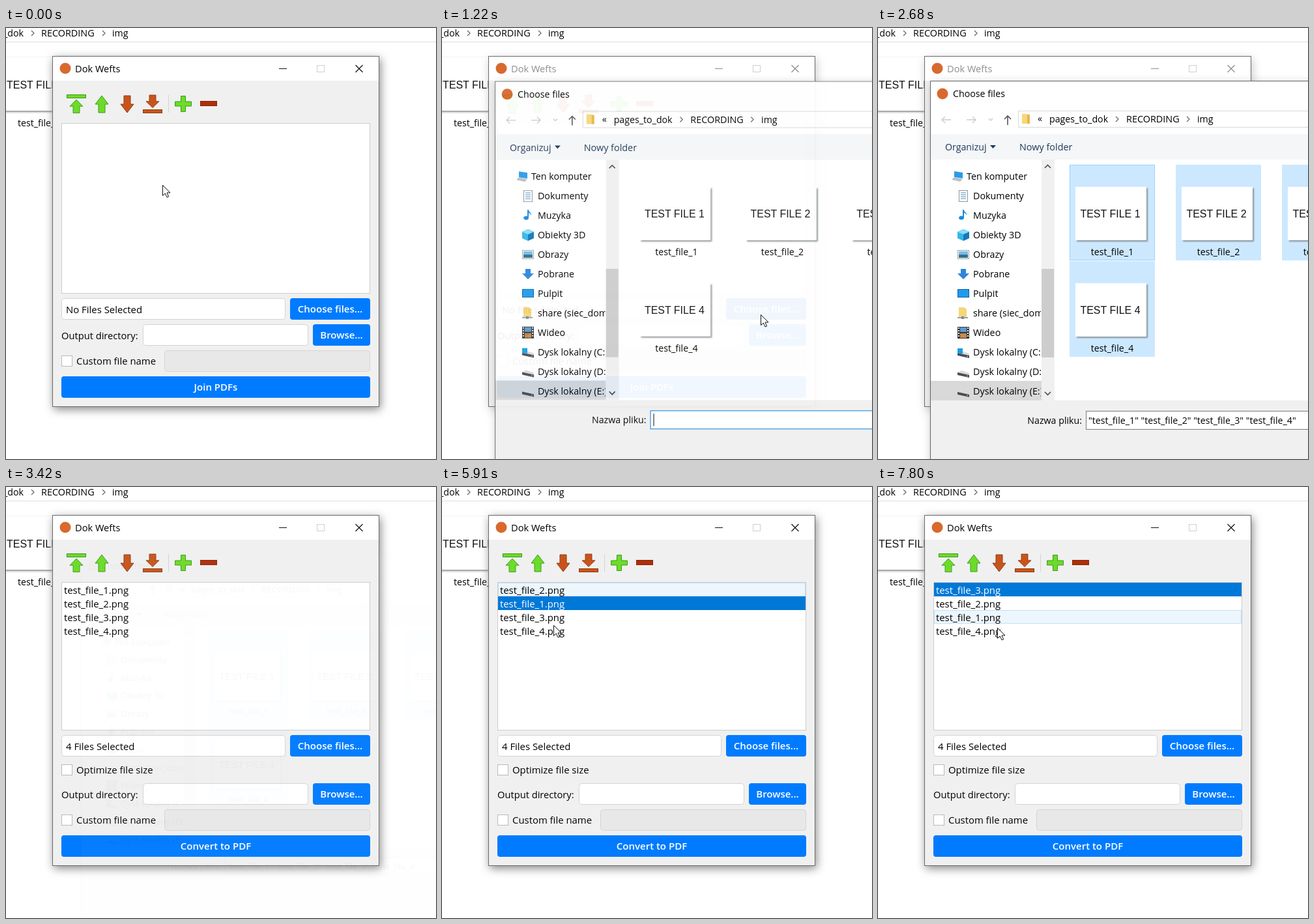
Animation, 660 px wide and 662 px high, one loop 7990 ms. Source, as an HTML page:

```html
<!DOCTYPE html>
<html lang="en">
<head>
<meta charset="utf-8">
<title>File joiner demo</title>
<style>
  html, body { margin: 0; width: 100%; height: 100%; overflow: hidden; background: #fff; }
  svg { display: block; width: 660px; height: 662px; }
  text { font-family: "Open Sans", "Noto Sans", sans-serif; white-space: pre; }
  .img { font-family: "Liberation Sans", Arial, sans-serif; }
  #app .ctl { stroke: #111; fill: none; }
  #app.idle .ctl { stroke: #8c8c8c; }
  #app.idle .title { fill: #8f8f8f; }
  #app.idle #shade { opacity: .45; }
</style>
</head>
<body>
<svg id="stage" viewBox="0 0 660 662" xmlns="http://www.w3.org/2000/svg"></svg>
<script>
const LOOP = 7990, BLUE = '#007bff';
const GREEN = 'fill="#6bdc28" stroke="#3c9a1b"';
const RUST = 'fill="#c9541b" stroke="#8e3b13"';

const rect = (x, y, w, h, fill, more = '') =>
  `<rect x="${x}" y="${y}" width="${w}" height="${h}" fill="${fill}" ${more}/>`;
const box = (x, y, w, h, fill, line, r = 0, more = '') =>
  rect(x + .5, y + .5, w - 1, h - 1, fill, `stroke="${line}" rx="${r}" ${more}`);
// y is the middle of the capital letters
const text = (x, y, s, size = 14.2, more = '') =>
  `<text x="${x}" y="${(y + size * .36).toFixed(1)}" font-size="${size}" ${more}>${s}</text>`;
const path = (d, more) => `<path d="${d}" ${more}/>`;
const line = (d, color, w = 1) => path(d, `fill="none" stroke="${color}" stroke-width="${w}"`);
const at = (x, y, s) => `<g transform="translate(${x} ${y})">${s}</g>`;
const group = (id, s, more = '') => `<g id="${id}" ${more}>${s}</g>`;
const MID = 'text-anchor="middle"';
const chevron = (x, y, color = '#666') => line(`M${x - 2} ${y - 4}l4 4l-4 4`, color, 1.2);

const button = (x, y, w, label, id = '') =>
  rect(x, y, w, 33, BLUE, `rx="4" ${id && `id="${id}"`}`) +
  text(x + w / 2, y + 17, label, 15, `${MID} font-weight="600" fill="#fff"`);
const field = (x, y, w, fill = '#fff') => box(x, y, w, 33, fill, '#d4d4d4', 4);
const check = (y, label) => box(85, y, 17, 17, '#fff', '#b9b9b9') + text(108, y + 9, label, 14.9);

function backdrop() {
  return text(27, 8, '_dok', 14.2, 'text-anchor="end"') + chevron(41, 8) +
    text(54, 8, 'RECORDING', 14.4) + chevron(150, 8) + text(163, 8, 'img') +
    rect(0, 21, 660, 1, '#dedede') + rect(0, 44, 71, 1, '#f4f4f4') +
    rect(0, 127, 72, 2, '#a8a8a8') + rect(0, 129, 72, 2, '#e2e2e2') +
    text(1, 87, 'TEST FILE 1', 16, 'class="img" fill="#111"') + text(18, 146, 'test_file_1');
}

function toolbar() {
  const up = 'M0 0L10 13H5V26H-5V13H-10Z', down = 'M0 26L10 13H5V0H-5V13H-10Z';
  return path(up, `${GREEN} transform="translate(108 110) scale(1 .79)"`) +
    box(93, 102, 30, 6, '#6bdc28', '#3c9a1b') +
    at(147, 104, path(up, GREEN)) + at(186, 104, path(down, RUST)) +
    path(down, `${RUST} transform="translate(225 103) scale(1 .75)"`) +
    box(210, 125, 30, 6, '#c9541b', '#8e3b13') + rect(249, 103, 1, 27, '#d2d2d2') +
    path('M268.5 104.5h7v8.5h9v7h-9v8.5h-7v-8.5h-9v-7h9z', GREEN) +
    box(298, 112, 26, 8, '#b02e0a', '#84240a');
}

function app() {
  const controls = path('M419 62.5h12M536.5 57l11 11m0-11l-11 11', 'class="ctl" stroke-width="1.2"') +
    box(477, 57, 12, 11, 'none', '#cfcfcf');
  const rows = [0, 1, 2, 3].map(i =>
    rect(86.5, 147.5 + 21 * i, 471, 20, 'none', `id="row${i}"`) +
    text(89, 158.5 + 21 * i, '', 14.9, `id="name${i}"`)).join('');
  return rect(71, 43, 502, 539, '#888', 'id="shade" filter="url(#soft)"') +
    box(71, 43, 502, 539, '#f0f0f0', '#6a6a6a') + rect(72, 44, 500, 37, '#fff') +
    '<circle cx="91" cy="62" r="8.5" fill="#d8692f"/>' +
    text(106, 62.5, 'Dok Wefts', 14.6, 'class="title"') + controls +
    rect(0, 98.5, 37, 37, '#dcebf7', 'id="hot" stroke="#b9d7ee"') + toolbar() +
    group('before', box(85, 146, 474, 262, '#fff', '#cdcdcd') + field(85, 415, 344) +
      text(92, 432.5, 'No Files Selected', 14.9) + button(436, 415, 123, 'Choose files...', 'choose') +
      button(85, 535, 474, 'Join PDFs')) +
    group('after', box(85, 146, 474, 228, '#fff', '#cdcdcd') + rows + field(85, 381, 344) +
      text(92, 398.5, '4 Files Selected', 14.9) + button(436, 381, 123, 'Choose files...') +
      check(426, 'Optimize file size') + button(85, 535, 474, 'Convert to PDF')) +
    text(85, 472.5, 'Output directory:', 14.7) + field(210, 455, 254) +
    button(471, 455, 88, 'Browse...') + check(503, 'Custom file name') + field(243, 495, 316, '#e8e8e8');
}

// sidebar icons, drawn around their middle
const drive = path('M-9 -1l6-3l12 4v3z', 'fill="#dadada"') + path('M-9 -1l18 4v4l-18-4z', 'fill="#4b4e52"') +
  rect(5, 4, 2, 1, '#9fe08a');
const monitor = box(-9, -7, 18, 13, '#1f9bec', '#0b62a8');
const icons = [
  path('M-5 -8l13 2v9l-13-2z', 'fill="#2c9be8"') + path('M-9 5l4-4l13 3l-4 4z', 'fill="#b9c0c6"'),
  box(-7, -9, 14, 18, '#fff', '#8c979f') + line('M-4 -5h8M-4 -2h8M-4 1h8M-4 4h8', '#4f8fc0'),
  path('M-1 -9h2c0 4 5 4 4 9c-1-3-2-4-4-4v8a4 3 0 1 1-2-3z', 'fill="#1b8be0"'),
  path('M-9 -5l9-4v18l-9-4z', 'fill="#35b5e8"') + path('M0 -9l9 4v10l-9 4z', 'fill="#1579b8"') +
    path('M-9 -5l9-4l9 4l-9 4z', 'fill="#8adcf7"'),
  box(-9, -7, 18, 14, '#fff', '#9aa3aa') + rect(-7, -5, 14, 5, '#72bdf0') + rect(-7, 0, 14, 5, '#3b6f86'),
  path('M-4 -8h8v7h5l-9 9l-9-9h5z', 'fill="#2d86dc"'),
  monitor,
  path('M-7 -9h8l4 3v12h-12z', 'fill="#f5d679"') + rect(-9, 6, 16, 2, '#96a3ad') + rect(-3, 5, 4, 4, '#7d8a94'),
  rect(-9, -9, 18, 18, '#333') + rect(-5, -8, 10, 7, '#5b9cd0') + rect(-5, 1, 10, 7, '#c78a4b') +
    path('M-7 -8v16M7 -8v16', 'stroke="#eee" stroke-width="2" stroke-dasharray="2 2"'),
  at(0, 2, drive) + rect(-9, -6, 8, 8, '#18a0e8'), at(0, 2, drive), at(0, 2, drive)
];
const places = ['Ten komputer', 'Dokumenty', 'Muzyka', 'Obiekty 3D', 'Obrazy', 'Pobrane', 'Pulpit',
  'share (siec_dom)', 'Wideo', 'Dysk lokalny (C:)', 'Dysk lokalny (D:)', 'Dysk lokalny (E:)'];
const tiles = [[294, 210], [457, 210], [620, 210], [294, 358]];

function dialog() {
  const side = places.map((p, i) => at(i ? 131 : 122, 228 + 30 * i, icons[i]) +
    text(i ? 146 : 136, 228 + 30 * i, p, 14.3)).join('');
  const files = tiles.map(([x, y], i) =>
    rect(x, y, 131, 147, '#cce8ff', `id="tile${i}"`) +
    rect(x + 11, y + 36, 109, 82, '#7d858a', 'filter="url(#thin)" opacity=".85"') +
    rect(x + 9, y + 34, 109, 82, '#fff') +
    text(x + 62.5, y + 75, 'TEST FILE ' + (i + 1), 16, `class="img" fill="#111" ${MID}`) +
    text(x + 65.5, y + 134, 'test_file_' + (i + 1), 14.2, MID)).join('');
  return rect(80, 81, 883, 640, '#777', 'filter="url(#soft)" opacity=".5"') +
    box(80, 81, 883, 640, '#f0f0f0', '#666') + rect(81, 82, 881, 81, '#fff') +
    '<circle cx="99" cy="101" r="8.5" fill="#d8692f"/>' + text(115, 101, 'Choose files') +
    line('M112 141h-14m5-5l-5 5l5 5M136 141h14m-5-5l5 5l-5 5M170 139l3 3l3-3', '#cbcbcb', 1.3) +
    line('M199 149v-14m-5 5l5-5l5 5', '#555', 1.6) +
    box(215, 127, 600, 26, '#fff', '#d9d9d9') +
    path('M221 132h8l3 3v12h-11z', 'fill="#f7d778"') + rect(229, 133, 4, 14, '#e5b84c') +
    text(245, 139, '«') + text(263, 140, 'pages_to_dok') + chevron(367, 140) +
    text(381, 140, 'RECORDING', 14.4) + chevron(476, 140) + text(490, 140, 'img') +
    rect(81, 163, 881, 39, '#f5f6f7') + text(103, 183, 'Organizuj', 14.2, 'fill="#1e395b"') +
    path('M172 180h9l-4.5 5z', 'fill="#1e395b"') + text(217, 183, 'Nowy folder', 14.4, 'fill="#1e395b"') +
    rect(81, 202, 881, 370, '#fff') + rect(81, 542, 170, 30, '#d9d9d9') +
    `<g clip-path="url(#side)">${side}</g>` +
    rect(251, 202, 20, 370, '#f0f0f0') + rect(251, 370, 19, 136, '#cdcdcd') +
    line('M256 215l4.5-4.5l4.5 4.5M256 559l4.5 4.5l4.5-4.5', '#505050', 1.7) +
    files + box(294, 210, 131, 147, 'none', '#99d1ff', 0, 'id="focus"') +
    rect(0, 0, 0, 0, '#0066cc', 'id="band" fill-opacity=".33" stroke="#0078d7"') +
    text(313, 603, 'Nazwa pliku:', 14.2, 'text-anchor="end"') +
    box(319, 588, 500, 29, '#fff', '#0078d7', 0, 'id="entry"') +
    rect(324, 593, 1, 19, '#000', 'id="caret"') + text(323, 603, '', 14.2, 'id="picked"');
}

const stage = document.getElementById('stage');
stage.innerHTML = `<defs>
  <filter id="soft" x="-10%" y="-10%" width="120%" height="120%">
    <feOffset dx="2" dy="4"/><feGaussianBlur stdDeviation="7"/></filter>
  <filter id="thin"><feGaussianBlur stdDeviation=".8"/></filter>
  <clipPath id="side"><rect x="81" y="202" width="169" height="370"/></clipPath></defs>` +
  rect(0, 0, 660, 662, '#fff') + backdrop() + group('app', app()) + group('dialog', dialog()) +
  '<circle id="halo" r="15" fill="#ffff00" fill-opacity=".6"/>' +
  group('cursor', path('M.5 .5V16.5L4.3 13L7 19L9.6 18L7 12H12Z', 'fill="#fff" stroke="#111"'));

const el = {};
stage.querySelectorAll('[id]').forEach(n => el[n.id] = n);
const set = (id, attrs) => { for (const k in attrs) el[id].setAttribute(k, attrs[k]); };
const show = (id, on) => set(id, { visibility: on ? 'inherit' : 'hidden' });

// time, x, y of the pointer; eased in between
const route = [
  [0, 240, 241], [200, 240, 241], [620, 489, 440], [1500, 489, 440], [1900, 357, 538], [2010, 357, 538],
  [2070, 390, 506], [2130, 508, 438], [2190, 610, 350], [2250, 690, 290], [3240, 700, 520],
  [3540, 700, 520], [4020, 520, 343], [4320, 150, 161], [4560, 150, 161], [4860, 177, 131],
  [4950, 177, 131], [5040, 173, 117], [5560, 173, 117], [5720, 171, 212], [5910, 171, 212],
  [6210, 155, 202], [6430, 155, 202], [6650, 130, 141], [6950, 106, 121], [7340, 106, 121],
  [7800, 183, 216], [LOOP, 183, 216]
];
function pointer(t) {
  const i = Math.max(1, route.findIndex(p => p[0] >= t));
  const [a, x, y] = route[i - 1], [b, u, v] = route[i];
  const k = Math.min(1, Math.max(0, (t - a) / (b - a)));
  const e = k * k * (3 - 2 * k);
  return [x + (u - x) * e, y + (v - y) * e];
}

const ticks = [0, 1030, 1530, 3240, 5290, 5600, 5910, 6710, 7380];
function tick(t) {
  const s = ticks.filter(v => v <= t).pop();
  return s + Math.floor((t - s) / 60) * 60;
}
const presses = [[660, 780], [1980, 2550], [4380, 4500], [5290, 5410], [6270, 6390], [7070, 7190]];
const latest = (list, t) => list.filter(e => e[0] <= t).pop()[1];
const orders = [[0, '1234'], [5350, '2134'], [7130, '3214']];
const chosen = [[0, -1], [4440, 0], [5350, 1], [6330, 2], [7130, 0]];
const hovers = [[0, -1], [4290, 0], [6030, 2]];

function drawList(t) {
  const order = latest(orders, t), sel = latest(chosen, t), hover = latest(hovers, t);
  for (let i = 0; i < 4; i++) {
    const on = i === sel, over = i === hover;
    set('row' + i, {
      fill: on ? '#0078d7' : over ? '#edf6fd' : 'none',
      stroke: on ? '#0078d7' : over ? '#c3dff2' : 'none'
    });
    set('name' + i, { fill: on ? '#fff' : '#000' });
    el['name' + i].textContent = `test_file_${order[i]}.png`;
  }
}

function drawDialog(t) {
  const open = t >= 1030 && t < 3480;
  show('dialog', open);
  if (!open) return;
  let alpha = 1, scale = 1;
  if (t < 1270) {
    const k = .45 ** Math.floor((t - 1030) / 60);
    alpha = 1 - .6 * k;
    scale = 1 - .028 * k;
  } else if (t >= 3240) {
    const n = Math.floor((t - 3240) / 60);
    alpha = .7 * .33 ** n;
    scale = 1 - .02 * (n + 1);
  }
  set('dialog', { opacity: alpha, transform: `translate(522 351) scale(${scale}) translate(-522 -351)` });

  // the selection trails the pointer by one tick
  const [x, y] = pointer(Math.min(t, 2400) - 60);
  const dragging = t >= 2070 && t < 2560;
  show('band', dragging);
  set('band', { x: 357.5, y: y + .5, width: Math.max(0, x - 358), height: Math.max(0, 537 - y) });
  const names = [];
  tiles.forEach(([left, top], i) => {
    const on = t >= 2100 && x > left && y < top + 147;
    show('tile' + i, on);
    if (on) names.push(`"test_file_${i + 1}"`);
  });
  show('focus', names.length === 4);
  show('caret', t < 1530);
  set('entry', { stroke: names.length ? '#7a7a7a' : '#0078d7' });
  el.picked.textContent = names.join(' ');
}

function draw(now) {
  const t = tick(now), [x, y] = pointer(t);
  const after = t >= 3240;
  el.app.setAttribute('class', t >= 780 && !after ? 'idle' : '');
  show('before', !after);
  show('after', after);
  set('choose', { fill: x > 436 && y > 415 && t < 1500 ? '#0069d9' : BLUE });
  const slot = Math.round((x - 108) / 39);
  show('hot', after && y >= 98 && y < 136 && slot >= 0 && slot < 4);
  set('hot', { x: 89.5 + 39 * slot });
  drawList(t);
  drawDialog(t);
  show('halo', presses.some(([a, b]) => t >= a && t < b));
  set('halo', { cx: x, cy: y - 1 });
  set('cursor', { transform: `translate(${x.toFixed(1)} ${y.toFixed(1)})` });
}

const begin = performance.now();
function frame() {
  draw((performance.now() - begin) % LOOP);
  requestAnimationFrame(frame);
}
frame();
</script>
</body>
</html>
```
